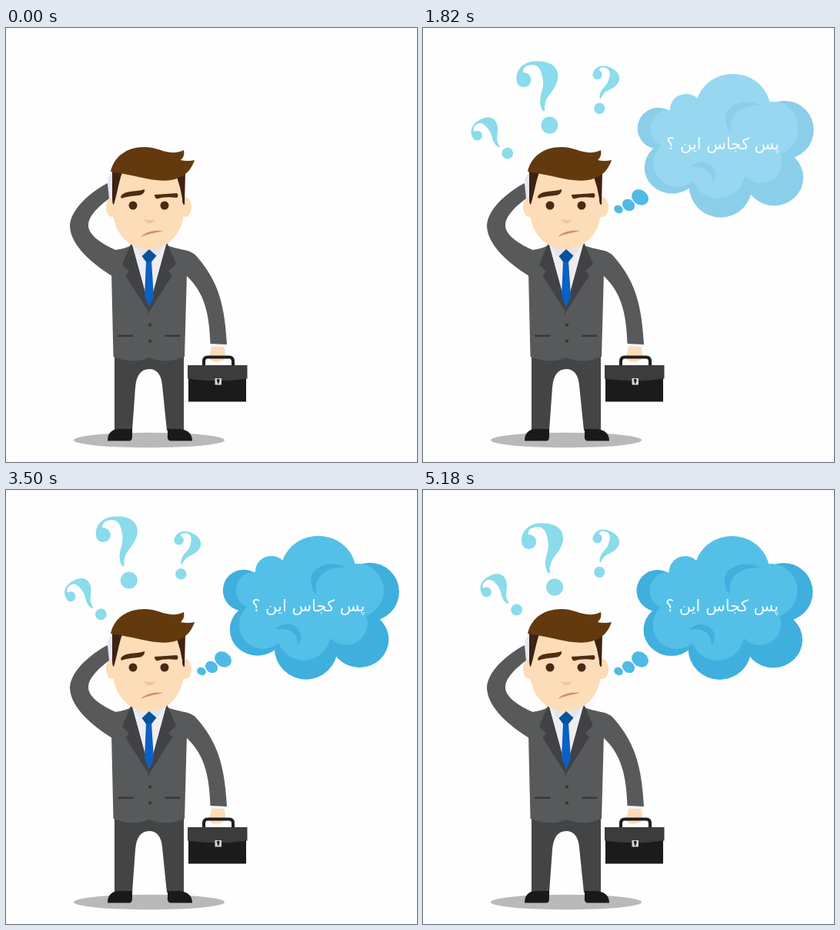
Recreate the animation shown at these times as an HTML page. Size 534 by 565 pixels, loop 5.25 s.

```html
<!DOCTYPE html>
<html lang="fa">
<head>
<meta charset="utf-8">
<title>Wondering man</title>
<style>
html, body { margin: 0; width: 100%; height: 100%; overflow: hidden; background: #fefefe; }
svg { display: block; width: 100%; height: 100%; }
text { font: 21px "DejaVu Sans", sans-serif; fill: #f4fbfe; text-anchor: middle; direction: rtl; }
</style>
</head>
<body>
<svg viewBox="0 0 534 565" xmlns="http://www.w3.org/2000/svg">
  <defs>
    <g id="mark" fill="#8adbeb">
      <circle r="11"/>
      <circle cx="-33.500" cy="-59" r="9.500"/>
      <path d="M-43-60C-43-76-30-84-14-83C2-83 12-75 11-62C9-46-4-40-6-27Q-7-22-6-19L-8-18C-13-24-13-32-11-40C-7-52-8-58-10-66C-12-76-18-80-26-78C-32-77-36-73-34-67Z"/>
    </g>
  </defs>

  <ellipse cx="186" cy="536.500" rx="98" ry="9.800" fill="#b9b9b9"/>

  <g id="legs">
    <path fill="#434446" d="M141 422V524H164L168 468Q170 444 186 444Q201 444 203 465L209 524H231V422Z"/>
    <path fill="#1a1a1a" d="M132 537.500Q132 523 146 522H164V531Q164 537 161 537.500ZM210 522H226Q242 524 242 537.500H213Q209 536 210 530Z"/>
  </g>

  <g id="arms">
    <path fill="#e6e7f2" d="M132 196L138 188V222L134 224Z"/>
    <path fill="#57595a" d="M132 202C112 212 83 236 83 258C84 284 114 308 138 323L160 287Q152 287 143 289C126 282 107 270 107 257C107 244 122 231 134 222Z"/>
    <path fill="#f5f5f6" d="M266 410H286L285 416H266Z"/>
    <path fill="#fddcb8" d="M267 415H283Q287 423 283 432Q276 436 268 434Q262 430 265 424Z"/>
    <path fill="#57595a" d="M222 287L236 290Q244 292 250 300C275 330 284 358 287 412L265.500 411C264 376 260 346 234 322Z"/>
  </g>

  <g id="jacket">
    <path fill="#57595a" d="M163 283Q152 288 143 289L137 318L139.500 428Q166 438 186 429Q208 438 232 428L235 318L238 291Q221 287 209 283Z"/>
    <path fill="#eeeef2" d="M163 279H209L186 364Z"/>
    <path fill="#e4e5e9" d="M164 279L175 297L186 288L196 297L208 279Z"/>
    <path fill="#414244" d="M163 279L151 308L160 317L155 322L185 369L186 363ZM209 279L221 307L211 316L216 322L187 368L183 375L186 363Z"/>
    <path fill="#0a61c4" d="M182 303H189L192 350L186 363L180 349Z"/>
    <path fill="#07529c" d="M186 288L195.500 296.500L189 304.500H182L176.500 297Z"/>
    <g fill="#36383a">
      <circle cx="187" cy="386.500" r="2.200"/>
      <circle cx="187" cy="407.500" r="2.200"/>
      <rect x="145" y="399.500" width="20.500" height="2.600" rx="1"/>
      <rect x="206" y="399.500" width="20.500" height="2.600" rx="1"/>
    </g>
  </g>

  <g id="briefcase">
    <path fill="none" stroke="#1f1f1f" stroke-width="4" d="M257 440V434Q257 428.500 262 428.500H290Q295 428.500 295 434V440"/>
    <path fill="#1c1b1b" d="M237 450H312V486.500H237Z"/>
    <path fill="#3c3c3d" d="M236 439H313.500V456.500Q275 462 236 456.500Z"/>
    <rect x="271.500" y="456" width="8.500" height="8.500" fill="#d4d4d4"/>
    <path fill="#222" d="M274 459a1.800 1.800 0 1 1 3.500 0L276.300 463H275.200Z"/>
  </g>

  <g id="head">
    <g fill="#fddcb8">
      <ellipse cx="138" cy="233" rx="8" ry="13"/>
      <ellipse cx="233" cy="233" rx="8" ry="13"/>
      <path d="M138 186V230C138 268 160 288 185 288C210 288 232 268 232 230V186Z"/>
    </g>
    <path fill="#3e2213" d="M138 185L151 188C146 202 144 218 140 230Q138 229 138 222ZM222 194L233 187L232 230Q229 231 229 222Q227 208 222 194Z"/>
    <path fill="#63390e" d="M136 187C140 168 156 155 180 155C200 155 211 168 231 159C232 165 231 168 227 172Q236 174 245 172C240 186 233 192 222 196C200 204 172 192 136 187Z"/>
    <path fill="#4f2c11" d="M149 219.500C154 211 166 214 180 210Q181 215 175 217.500C164 219 157 219 150 222ZM193 217Q208 216 222 215Q225 218 222 221Q206 219 196 222.500Q193 220.500 193 217Z"/>
    <g fill="#4a2916">
      <circle cx="165" cy="231" r="5.500"/>
      <circle cx="206" cy="231" r="5.500"/>
    </g>
    <path fill="#f1c59e" d="M179 249Q186 251 194 249Q186 260 179 249Z"/>
    <path fill="#cb9066" d="M175 272C182 265 192 263 204 264C195 266.500 185 267.500 175 272Z"/>
  </g>

  <g fill="#4fbae6">
    <ellipse id="dot1" rx="6" ry="5" transform="translate(254 236) rotate(30)"/>
    <ellipse id="dot2" rx="8.500" ry="7.300" transform="translate(267 230.500) rotate(40)"/>
    <ellipse id="dot3" rx="11.500" ry="9.500" transform="translate(282 220.500) rotate(35)"/>
  </g>

  <use id="left" href="#mark"/>
  <use id="middle" href="#mark"/>
  <use id="right" href="#mark"/>

  <g id="cloud">
    <g fill="#3fafdd">
      <circle cx="307" cy="131" r="27"/>
      <ellipse cx="325" cy="182" rx="36" ry="34"/>
      <circle cx="388" cy="206" r="41"/>
      <ellipse cx="457.500" cy="195" rx="38" ry="36.500"/>
      <circle cx="471" cy="133" r="38"/>
    </g>
    <g fill="#54c0e8">
      <circle cx="343" cy="107" r="21"/>
      <ellipse cx="404" cy="107" rx="49" ry="47"/>
      <ellipse cx="320" cy="131" rx="23" ry="24"/>
      <circle cx="332" cy="176" r="31"/>
      <circle cx="385" cy="187" r="35"/>
      <circle cx="440" cy="174" r="28"/>
      <ellipse cx="455" cy="131" rx="34" ry="35"/>
      <path d="M322 112L345 95H440L470 130L455 180L400 200H345L315 170Z"/>
    </g>
    <path fill="#3fafdd" d="M440 101C418 90 392 100 394.500 122Q396 131 402 137C397 115 412 100 440 101ZM348 182C358 171 376 173 381 187Q383 196 377 202C378 187 366 179 348 182Z"/>
    <text x="391" y="158">پس کجاس این ؟</text>
  </g>
</svg>
<script>
const LOOP = 5250, STEP = 70;
const $ = id => document.getElementById(id);

const clamp = v => Math.min(1, Math.max(0, v));
const wave = (t, size, period, peak) => size * Math.cos(2 * Math.PI * (t - peak) / period);

function fade(id, t, from, to) {
  $(id).setAttribute("opacity", clamp((t - from) / (to - from)));
}

function place(id, x, y, angle = 0, size = 1) {
  $(id).setAttribute("transform", `translate(${x} ${y}) rotate(${angle}) scale(${size})`);
}

function draw(t) {
  fade("left", t, 70, 800);
  fade("middle", t, 630, 1560);
  fade("right", t, 700, 1850);
  fade("dot1", t, 850, 1350);
  fade("dot2", t, 950, 1400);
  fade("dot3", t, 1100, 1560);
  fade("cloud", t, 1400, 2100);

  // Each floating part wobbles on one or two slow waves per axis.
  place("left",
    120.5 + wave(t, 5.5, 1130, 1340) + wave(t, 6, 7000, 5600),
    160.5 - wave(t, 5, 2170, 3010) + wave(t, 2.5, 1000, 1400), -30, .67);
  place("middle",
    163.7 + wave(t, 4.5, 1120, 1890) + wave(t, 3.8, 2500, 2900),
    122 + wave(t, 4.5, 680, 1800));
  place("right",
    228.3 + wave(t, 1, 1100, 1850),
    105.5 + wave(t, 4, 2200, 1200), 26, .65);
  place("cloud",
    2 + wave(t, 3, 3600, 3800) + wave(t, 3, 530, 2735),
    1.8 + wave(t, 2.2, 1800, 2650));
}

const start = performance.now();
function tick() {
  const t = (performance.now() - start) % LOOP;
  draw(Math.floor(t / STEP) * STEP);
  requestAnimationFrame(tick);
}
tick();
</script>
</body>
</html>
```
